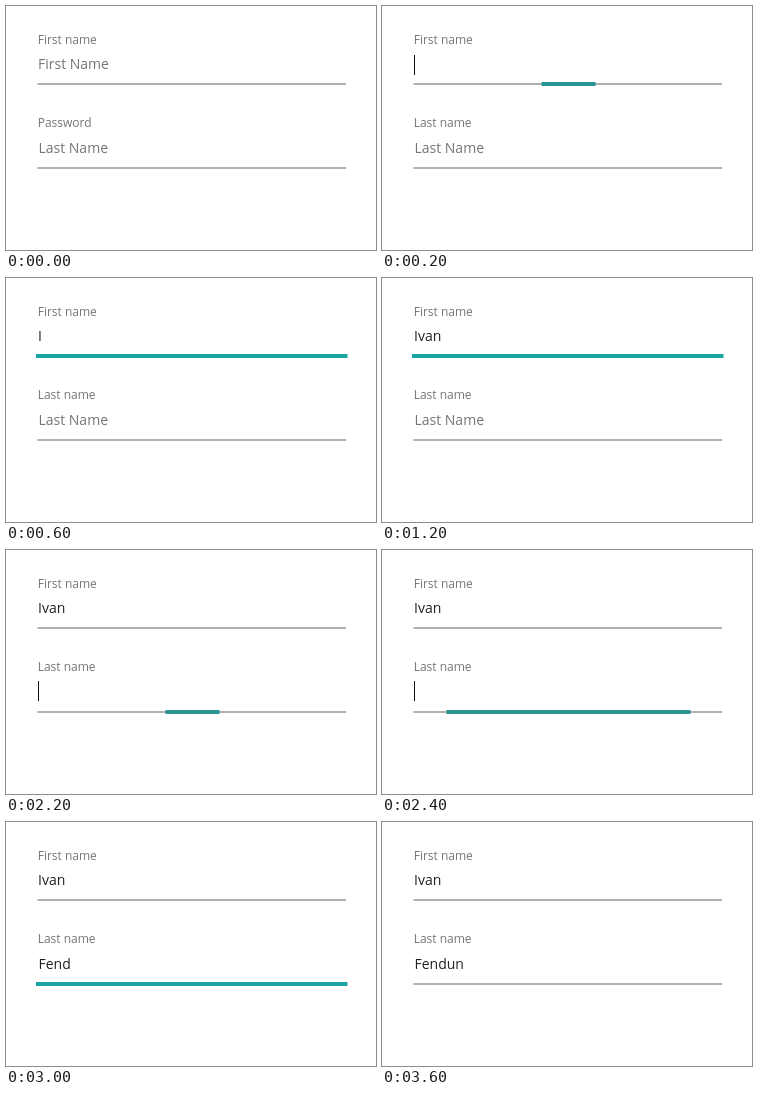
Write an HTML page that moves like this. It is 370 px wide and 244 px high and loops after 5.6 s.

```html
<!DOCTYPE html>
<html lang="en">
<head>
<meta charset="utf-8">
<title>Name form</title>
<style>
  html, body { margin: 0; width: 100%; height: 100%; overflow: hidden; background: #fff; }
  svg { display: block; width: 370px; height: 244px; }
  text { font: 14px "Open Sans", "Noto Sans", sans-serif; fill: #757575; }
  .label { font-size: 12px; }
  .typed { fill: #212121; }
  .rule { fill: #b0b0b0; }
  .caret { fill: #111; }
</style>
</head>
<body>
<svg viewBox="0 0 370 244">
  <g class="field">
    <text class="label" x="31.7" y="38">First name</text>
    <text class="value" x="32" y="63"></text>
    <rect class="caret" x="32" y="49" width="1" height="20"/>
    <rect class="rule" x="31.5" y="77" width="308.5" height="2"/>
    <rect class="focus" y="76" height="4"/>
  </g>
  <g class="field">
    <text class="label" x="31.7" y="121"></text>
    <text class="value" x="32.5" y="147"></text>
    <rect class="caret" x="32" y="131" width="1" height="20"/>
    <rect class="rule" x="31.5" y="161" width="308.5" height="2"/>
    <rect class="focus" y="160" height="4"/>
  </g>
</svg>
<script>
  const LOOP = 5600, TICK = 100;
  const LEFT = 30, RIGHT = 341.5, MID = 186.5;

  // keys: the time at which each letter appears
  const fields = [
    { hint: 'First Name', name: 'Ivan', start: 200, end: 2200,
      keys: [600, 800, 1000, 1200] },
    { hint: 'Last Name', name: 'Fendun', start: 2200, end: 3600,
      keys: [2600, 2700, 2800, 3000, 3200, 3400] }
  ];

  document.querySelectorAll('.field').forEach((group, i) => {
    for (const part of ['label', 'value', 'caret', 'focus'])
      fields[i][part] = group.querySelector('.' + part);
  });

  function setText(node, text) {
    if (node.textContent !== text) node.textContent = text;
  }

  function drawField(f, t) {
    const touched = t >= f.start;
    const active = touched && t < f.end;
    const count = f.keys.filter(k => t >= k).length;

    setText(f.value, touched ? f.name.slice(0, count) : f.hint);
    f.value.classList.toggle('typed', touched);
    f.caret.style.display = active && !count ? '' : 'none';

    f.focus.style.display = active ? '' : 'none';
    if (!active) return;
    const half = 27 + 47.5 * Math.floor((t - f.start) / TICK);
    const x = Math.max(LEFT, MID - half);
    f.focus.setAttribute('x', x);
    f.focus.setAttribute('width', Math.min(RIGHT, MID + half) - x);
    f.focus.setAttribute('fill', x > LEFT ? '#269594' : '#1aa5a5');
  }

  function draw(now) {
    const t = now % LOOP;
    setText(fields[1].label, t < 200 ? 'Password' : 'Last name');
    for (const f of fields) drawField(f, t);
  }

  const begin = performance.now();
  function frame() {
    draw(performance.now() - begin);
    requestAnimationFrame(frame);
  }
  frame();
</script>
</body>
</html>
```
